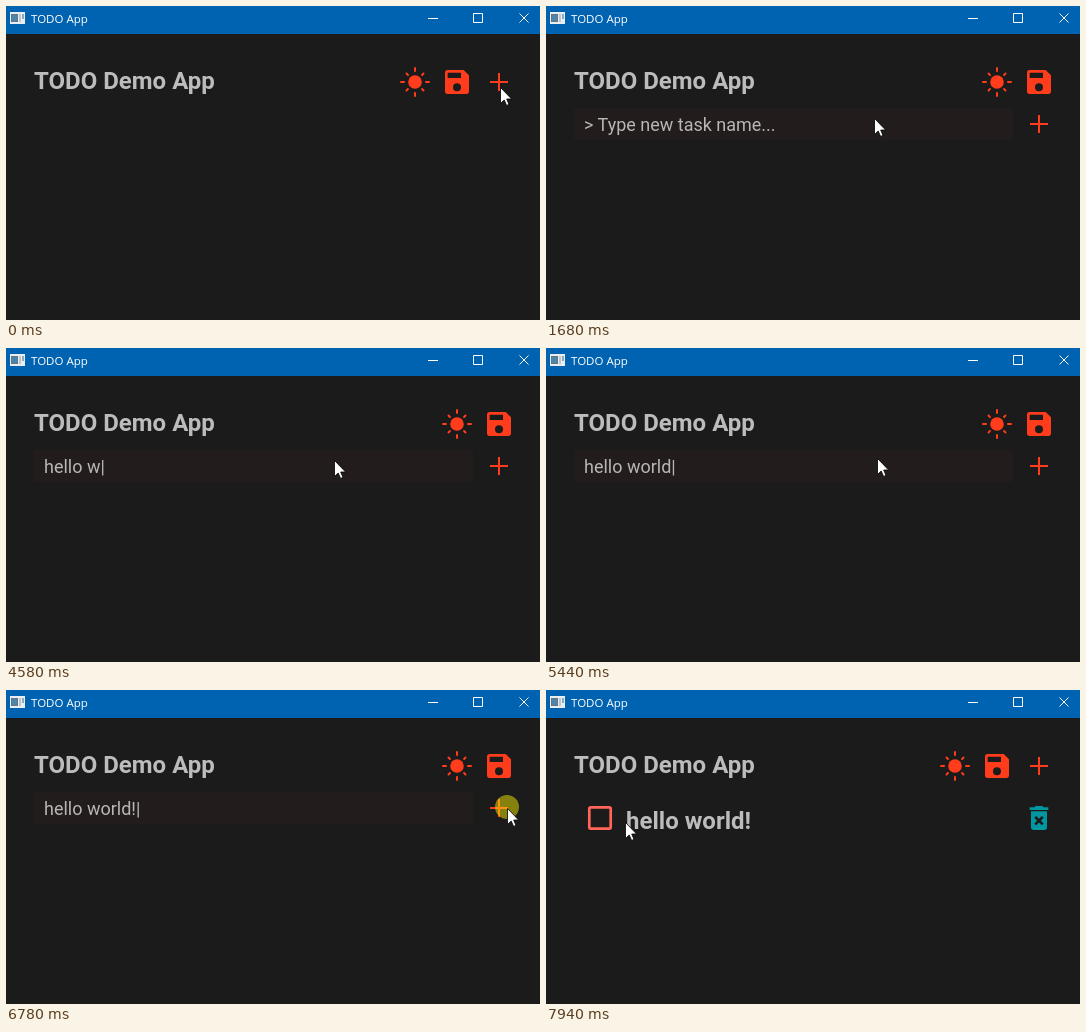
An HTML page that plays this animation: 534 by 314 pixels, repeating every 8000 ms.

```html
<!DOCTYPE html>
<html lang="en">
<head>
<meta charset="utf-8">
<title>TODO App</title>
<style>
  html, body { margin: 0; width: 100%; height: 100%; overflow: hidden; background: #1b1b1b; }
  svg { display: block; width: 534px; height: 314px; }
  text { font-family: Roboto, sans-serif; fill: #bcbcbc; }
  .heading { font-size: 24px; font-weight: 700; }
  .field { font-size: 18px; }
  .caption { font: 11.5px "Open Sans", sans-serif; fill: #fff; }
  .accent { fill: #ff3c1b; }
  .accent-line { fill: none; stroke: #ff3c1b; stroke-width: 2; }
</style>
</head>
<body>
<svg viewBox="0 0 534 314">
  <rect width="534" height="314" fill="#1b1b1b"/>

  <rect width="534" height="28" fill="#0063b1"/>
  <g>
    <rect x="4" y="6" width="15" height="12" fill="#e9eef2"/>
    <rect x="5" y="8" width="7" height="8" fill="#66747e"/>
    <rect x="6" y="9" width="5" height="6" fill="#4d86ad"/>
    <rect x="13" y="8" width="2" height="8" fill="#b9c8d2"/>
    <rect x="16" y="8" width="2" height="5" fill="#8fa9ba"/>
  </g>
  <text class="caption" x="25" y="17">TODO App</text>
  <path d="M422 12.5h10M467.5 7.5h9v9h-9zM513.5 7.5l9 9m0-9l-9 9" fill="none" stroke="#fff"/>

  <text class="heading" x="28" y="83">TODO Demo App</text>

  <g id="tools">
    <circle class="accent" cx="409" cy="76" r="6.8"/>
    <g id="rays" class="accent-line" stroke-linecap="round" transform="translate(409 76)"></g>
    <path class="accent" fill-rule="evenodd" transform="translate(435 60) scale(1.3333)"
      d="M17 3H5a2 2 0 0 0-2 2v14a2 2 0 0 0 2 2h14a2 2 0 0 0 2-2V7zM12 19a3 3 0 1 1 0-6 3 3 0 0 1 0 6zM15 9H5V5h10z"/>
  </g>

  <g id="entry">
    <rect x="28" y="102" width="439" height="32" rx="2" fill="#231c1c"/>
    <text id="field" class="field" x="38" y="125"></text>
  </g>

  <path id="plus" class="accent-line" d="M484 76h18M493 67v18"/>

  <g id="task">
    <rect x="43.3" y="117.3" width="21.4" height="21.4" rx="1.4" fill="none" stroke="#ff6659" stroke-width="2.7"/>
    <text class="heading" x="80" y="139">hello world!</text>
    <path fill="#0097a0" fill-rule="evenodd" transform="translate(477 112) scale(1.3333)"
      d="M6 19a2 2 0 0 0 2 2h8a2 2 0 0 0 2-2V7H6zM8.46 11.88l1.41-1.41L12 12.59l2.12-2.12 1.41 1.41L13.41 14l2.12 2.12-1.41 1.41L12 15.41l-2.12 2.12-1.41-1.41L10.59 14zM15.5 4l-1-1h-5l-1 1H5v2h14V4z"/>
  </g>

  <g id="pointer">
    <circle id="press" r="12" cy="-1" fill="#fff500" fill-opacity=".47"/>
    <path d="M.5.5V16.5L4.2 13 6.6 18.4 9 17.4 6.7 12H11.6z" fill="#fff" stroke="#000" stroke-width=".8"/>
  </g>
</svg>
<script>
const LOOP = 8000;
const $ = id => document.getElementById(id);
const PLACEHOLDER = '> Type new task name...';

// Each move: start time, number of steps, ms per step, end point, height of the bend
const START = [494, 81];
const MOVES = [
  { at: 860, steps: 3, every: 60, to: [334, 112], bend: 0 },
  { at: 1050, steps: 5, every: 67.5, to: [327, 112], bend: 0 },
  { at: 1680, steps: 1, every: 1, to: [328, 112], bend: 0 },
  { at: 5440, steps: 1, every: 1, to: [331, 110], bend: 0 },
  { at: 6020, steps: 11, every: 65, to: [501, 118], bend: 18 },
  { at: 7230, steps: 12, every: 64.5, to: [79, 132], bend: 72 }
];

const TYPED = [
  [2670, 'h'], [2850, 'he'], [2980, 'hel'], [3160, 'hell'], [3340, 'hello'],
  [4580, 'hello w'], [4670, 'hello wo'], [4760, 'hello wor'],
  [4960, 'hello worl'], [5030, 'hello world'], [5890, 'hello world!']
];

const between = (t, from, to) => t >= from && t < to;
const mix = (a, b, p) => a + (b - a) * p;
const show = (id, visible) => $(id).setAttribute('visibility', visible ? 'visible' : 'hidden');

function stepProgress(t, { at, steps, every }) {
  return Math.min(1, (Math.floor((t - at) / every) + 1) / steps);
}

function pointerAt(t) {
  let from = START;
  for (const move of MOVES) {
    if (t < move.at) break;
    const p = stepProgress(t, move);
    const eased = (1 - Math.cos(Math.PI * p)) / 2;
    if (p < 1) {
      return [
        mix(from[0], move.to[0], eased),
        mix(from[1], move.to[1], eased) - 2 * move.bend * eased * (1 - eased)
      ];
    }
    from = move.to;
  }
  return from;
}

function drawField(t) {
  const typed = TYPED.filter(([at]) => t >= at).pop();
  $('field').textContent = typed ? typed[1] + '|' : PLACEHOLDER;
  const hover = t < 1050 ? 0 : stepProgress(t, MOVES[1]);
  const tone = Math.round(mix(138, 184, hover));
  $('field').style.fill = `rgb(${tone},${tone - 2},${tone - 2})`;
}

function draw(t) {
  const editing = between(t, 360, 6920);
  show('entry', editing);
  show('task', t >= 6920);
  $('tools').setAttribute('transform', `translate(${editing ? 42 : 0} 0)`);
  $('plus').setAttribute('transform', `translate(0 ${editing ? 42 : 0})`);
  drawField(t);
  const [x, y] = pointerAt(t).map(Math.round);
  $('pointer').setAttribute('transform', `translate(${x} ${y})`);
  show('press', between(t, 310, 360) || between(t, 6780, 6920));
}

for (let i = 0; i < 8; i++) {
  const [inner, outer] = i % 2 ? [10, 12] : [11, 14];
  $('rays').innerHTML += `<path d="M${inner} 0H${outer}" transform="rotate(${i * 45})"/>`;
}

const begin = performance.now();
function frame() {
  draw((performance.now() - begin) % LOOP);
  requestAnimationFrame(frame);
}
frame();
</script>
</body>
</html>
```
